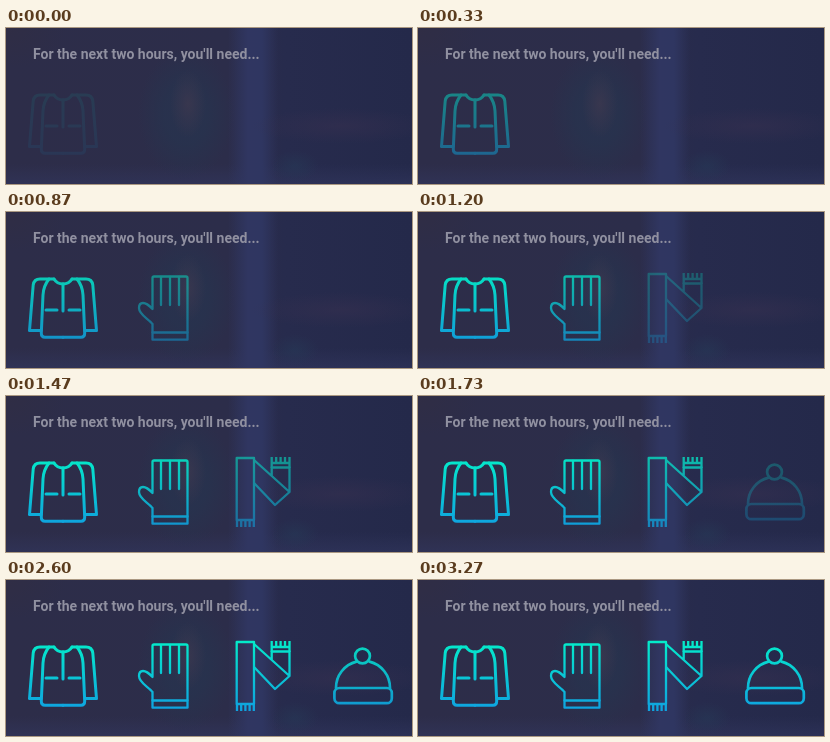
An HTML page for the animation above (3.87 s loop, 406x156 px).

```html
<!DOCTYPE html>
<html lang="en">
<head>
<meta charset="utf-8">
<title>What to wear</title>
<style>
  html, body { margin: 0; width: 100%; height: 100%; overflow: hidden; background: #2b2d4b; }
  svg { display: block; position: absolute; inset: 0; width: 406px; height: 156px; }
  .backdrop {
    position: absolute; inset: 0;
    background:
      radial-gradient(ellipse 18px 34px at 182px 76px, #463b5088, #463b5000),
      radial-gradient(ellipse 48px 66px at 180px 86px, #26344faa 45%, #26344f00),
      radial-gradient(ellipse 24px 16px at 289px 138px, #26385699, #26385600),
      radial-gradient(ellipse 90px 18px at 335px 98px, #37305088, #37305000),
      radial-gradient(ellipse 60px 40px at 0 0, #322d4188, #322d4100),
      linear-gradient(90deg, #2f366200 222px, #303661 242px, #2f3661 256px, #2f366100 272px),
      linear-gradient(#32376000 136px, #32376088 156px),
      linear-gradient(90deg, #2d2d49, #2c2d4a 220px, #272b4d 280px, #24294a);
  }
  text { font: 700 14px Roboto, Arial, sans-serif; fill: #9090a0; }
  .icon {
    fill: none; stroke: url(#tint); stroke-width: 2.3;
    stroke-linecap: round; stroke-linejoin: round;
    animation: 3870ms linear infinite;
  }
  .jacket { stroke-width: 3; animation-name: jacket; }
  .glove { animation-name: glove; }
  .scarf { animation-name: scarf; stroke-linecap: butt; }
  .hat { animation-name: hat; stroke-width: 2.7; }

  /* Each icon starts about 530 ms after the one before it. */
  @keyframes jacket {
    0% { opacity: .08; animation-timing-function: cubic-bezier(.33, .85, .67, 1); }
    43%, 100% { opacity: 1; }
  }
  @keyframes glove {
    0%, 12.2% { opacity: 0; animation-timing-function: cubic-bezier(.33, .85, .67, 1); }
    56%, 100% { opacity: 1; }
  }
  @keyframes scarf {
    0%, 26% { opacity: 0; animation-timing-function: cubic-bezier(.33, .85, .67, 1); }
    70%, 100% { opacity: 1; }
  }
  @keyframes hat {
    0%, 39.8% { opacity: 0; animation-timing-function: cubic-bezier(.33, .85, .67, 1); }
    84%, 100% { opacity: 1; }
  }
</style>
</head>
<body>
<div class="backdrop"></div>
<svg viewBox="0 0 406 156">
  <defs>
    <linearGradient id="tint" gradientUnits="userSpaceOnUse" x1="0" y1="62" x2="0" y2="129">
      <stop offset="0" stop-color="#04ebca"/>
      <stop offset="1" stop-color="#0fa3e0"/>
    </linearGradient>
    <g id="sleeve">
      <path d="M48 67H34Q28 67 27.2 73L23.5 118.5H35"/>
      <path d="M43 67C39 72 37.3 77 37 83L35.3 121Q35.3 125.3 39 125.3H57"/>
      <path d="M48 67Q51 72 57 72M40 98H51"/>
    </g>
  </defs>

  <text x="27" y="31">For the next two hours, you'll need...</text>

  <g class="icon jacket">
    <use href="#sleeve"/>
    <use href="#sleeve" transform="matrix(-1 0 0 1 114 0)"/>
    <path d="M57 72V99"/>
  </g>

  <g class="icon glove">
    <path d="M146.5 120.5V112C143 107 133 103 133 96Q133 91 137 91Q141 91 146.5 97V66Q146.5 64.5 148 64.5H180Q181.5 64.5 181.5 66V120.5"/>
    <path d="M155 65V93M164 65V93M173 65V93"/>
    <path d="M146.5 120.5H181.5V127.7H146.5Z"/>
  </g>

  <g class="icon scarf">
    <path d="M230.7 124V62H248V124Z"/>
    <path d="M248 64L283.5 96V71.5H265.7V80M248 87L269 109L283.5 96"/>
    <path d="M231 124V131M235.2 124V131M239.4 124V131M243.6 124V131M247.8 124V131"/>
    <path d="M265.7 72V61M270.2 67V61M274.6 67V61M279 67V61M283.5 72V61M266 67H283"/>
  </g>

  <g class="icon hat">
    <circle cx="356.5" cy="76" r="7.4"/>
    <path d="M330 108A27 27 0 0 1 350.5 81.6M363.5 81.6A27 27 0 0 1 384 108"/>
    <rect x="328.4" y="108" width="57.4" height="15.2" rx="5"/>
  </g>
</svg>
</body>
</html>
```
